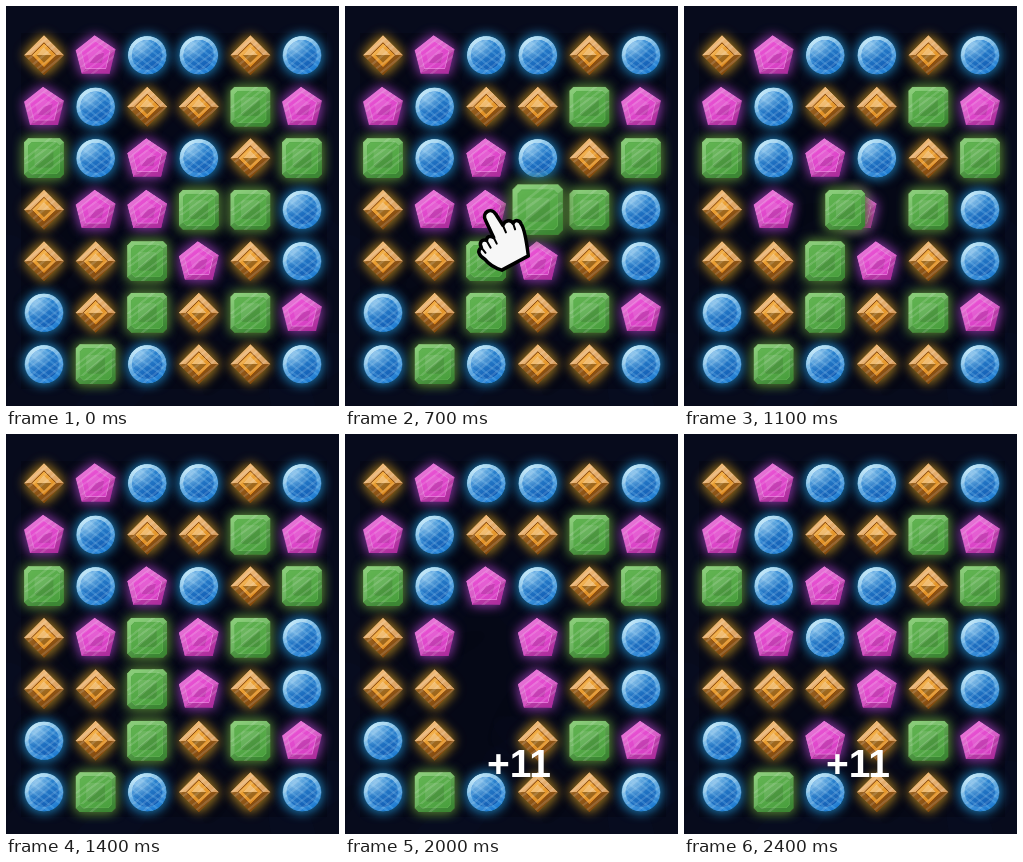
Recreate the animation shown at these times as an HTML page with a canvas. Size 333 px wide and 400 px high, loop 2500 ms.

```html
<!DOCTYPE html>
<html lang="en">
<head>
<meta charset="utf-8">
<title>Gem swap</title>
<style>
html, body { margin: 0; width: 100%; height: 100%; overflow: hidden; background: #070b1c; }
canvas { display: block; }
</style>
</head>
<body>
<canvas id="stage" width="333" height="400"></canvas>
<script>
const ctx = document.getElementById('stage').getContext('2d');
const LOOP = 2500, STEP = 100;
const board = ['OPBBOB', 'PBOOGP', 'GBPBOG', 'OPPGGB', 'OOGPOB', 'BOGOGP', 'BGBOOB'];
const colX = c => 38 + c * 51.6;
const rowY = r => 49.2 + r * 51.5;

const ring = (n, r) => Array.from({ length: n }, (_, i) => {
  const a = i * 2 * Math.PI / n;
  return [r * Math.cos(a), r * Math.sin(a)];
});
// top and low shade the body, lit and core the flat face, line its outline
const kinds = {
  O: { pts: [[0, -20], [20, 0], [0, 20], [-20, 0]], inner: .62, contrast: .3,
       top: '#eda040', low: '#b8640f', lit: '#ffbe50', core: '#d0780f', line: '#8a4a0c', glow: '#8f6a1c' },
  P: { pts: [[-1, -20], [20, -6], [14, 18.5], [-14, 18.5], [-20, -5]], inner: .72, contrast: .1,
       top: '#e968d6', low: '#c332b0', lit: '#ee58d8', core: '#d23ac0', line: '#e673d8', glow: '#74308c' },
  B: { pts: ring(40, 19.3), inner: .78, contrast: 0,
       top: '#b4e0f2', low: '#1676d0', lit: '#3a98dc', core: '#0c55b0', line: '#2f86d4', glow: '#1a6a9c' },
  G: { pts: [[-16, -20], [16, -20], [20, -16], [20, 16], [16, 20], [-16, 20], [-20, 16], [-20, -16]], inner: .78, contrast: .1,
       top: '#7cc66a', low: '#43963a', lit: '#62b452', core: '#4aa03e', line: '#5cae4e', glow: '#4c7430' }
};

function shape(g, pts, fill, s = 1) {
  g.beginPath();
  pts.forEach(([x, y]) => g.lineTo(x * s, y * s));
  g.closePath();
  g.fillStyle = fill;
  g.fill();
}

function slope(g, from, to) {
  const grad = g.createLinearGradient(-9, -18, 9, 18);
  grad.addColorStop(0, from);
  grad.addColorStop(1, to);
  return grad;
}

// Each gem is painted once at double size.
function makeGem({ pts, inner, contrast, top, low, lit, core, line, glow }) {
  const c = document.createElement('canvas');
  c.width = c.height = 128;
  const g = c.getContext('2d');
  const round = pts.length > 12;
  g.translate(64, 64);
  g.scale(2, 2);
  g.shadowColor = glow;
  g.shadowBlur = 24;
  const body = slope(g, top, low);
  shape(g, pts, body);
  shape(g, pts, body, .98);
  g.shadowColor = 'transparent';

  g.globalCompositeOperation = 'source-atop';
  const facets = s => pts.forEach(([x, y], i) => {
    const [u, v] = pts[(i + 1) % pts.length];
    const bright = -(x + u) * .4 - (y + v) > 0;
    g.globalAlpha = contrast;
    shape(g, [[x * s, y * s], [u * s, v * s], [0, 0]], bright ? '#fff' : '#000');
    g.globalAlpha = 1;
  });
  facets(1);
  shape(g, pts, slope(g, lit, core), inner);
  g.lineWidth = .8;
  g.strokeStyle = line;
  g.stroke();
  facets(inner * .6);

  // Slanted reflections, crossed on the round gem
  g.beginPath();
  pts.forEach(([x, y]) => g.lineTo(x, y));
  g.clip();
  const streaks = (angle, color) => {
    g.save();
    g.rotate(angle);
    [[-13, 3], [-7, 1.5], [-2, 4], [6, 1.5], [11, 3]].forEach(([y, h]) =>
      shape(g, [[-20, y + h], [18, y - 2], [20, y], [-16, y + h + 1.5]], color));
    g.restore();
  };
  streaks(-.55, '#ffffff22');
  if (round) {
    streaks(.75, '#8fd4ff38');
    const sheen = g.createRadialGradient(-9, -11, 1, -9, -11, 17);
    sheen.addColorStop(0, '#d8f2ff90');
    sheen.addColorStop(1, '#d8f2ff00');
    shape(g, pts, sheen);
  }
  return c;
}
const gems = Object.fromEntries(Object.entries(kinds).map(([k, v]) => [k, makeGem(v)]));

function gem(kind, x, y, scale = 1, alpha = 1) {
  const w = 64 * scale;
  ctx.globalAlpha = alpha;
  ctx.drawImage(gems[kind], x - w / 2, y - w / 2, w, w);
  ctx.globalAlpha = 1;
}

function backdrop() {
  ctx.fillStyle = '#070b1c';
  ctx.fillRect(0, 0, 333, 400);
  let seed = 7;
  const rnd = () => (seed = seed * 16807 % 2147483647) / 2147483647;
  for (let i = 0; i < 40; i++) {
    ctx.fillStyle = i % 2 ? '#18234614' : '#00000018';
    ctx.beginPath();
    ctx.ellipse(rnd() * 333, rnd() * 400, 10 + rnd() * 35, 6 + rnd() * 20, rnd() * 3, 0, 7);
    ctx.fill();
  }
  ctx.fillStyle = '#02030b50';
  ctx.fillRect(15, 27, 306, 356);
}

const palm = new Path2D('M1 8C-3 0 7-5 11 2L18 13C20 8 26 7 28 11C30 7 35 8 36 12C39 16 41 27 43 43L17 57C10 55 4 51 0 46C-5 43-8 38-3 35C-6 30-2 26 2 28C2 24 6 23 9 25Z');
const creases = new Path2D('M9 25l3 6M2 28l4 7M-3 35l4 5M18 13l3 7M28 11l2 6');
function hand(x, y) {
  ctx.save();
  ctx.translate(x, y);
  ctx.scale(1.02, 1.02);
  ctx.fillStyle = '#f7f7f7';
  ctx.strokeStyle = '#000';
  ctx.lineJoin = ctx.lineCap = 'round';
  ctx.lineWidth = 3.4;
  ctx.fill(palm);
  ctx.stroke(palm);
  ctx.lineWidth = 2;
  ctx.stroke(creases);
  ctx.restore();
}

// Eased progress of a move that starts at the given time
function ease(t, start, span = 350) {
  const p = Math.min(1, Math.max(0, (t - start) / span));
  return .5 - Math.cos(p * Math.PI) / 2;
}

function draw(t) {
  const swap = ease(t, 900), fade = 1 - ease(t, 1600), fall = ease(t, 2030);
  const x2 = colX(2), shift = swap * 51.6;
  backdrop();
  board.forEach((row, r) => [...row].forEach((kind, c) => {
    const moving = c === 2 && r < 6 || c === 3 && r === 3;
    if (!moving) gem(kind, colX(c), rowY(r));
  }));
  [...'BOP'].forEach((kind, r) => {
    gem(kind, x2, rowY(r) + fall * 154.5);
    if (fall > 0) gem(kind, x2, rowY(r) - (1 - fall) * 165);
  });
  gem('P', x2 + shift, rowY(3));
  if (fade > 0) {
    gem('G', x2, rowY(4), 1, fade);
    gem('G', x2, rowY(5), 1, fade);
    gem('G', colX(3) - shift, rowY(3), t >= 600 && t < 900 ? 1.27 : 1, fade);
  }
  if (t >= 200 && t < 900) hand(t < 600 ? 192.5 : 139.5, 206);
  if (t >= 1900) {
    ctx.font = 'bold 39px "Liberation Sans", Arial, sans-serif';
    ctx.textAlign = 'center';
    ctx.fillStyle = '#fff';
    ctx.fillText('+11', 174, 343);
  }
}

const begin = performance.now();
function tick() {
  const t = (performance.now() - begin) % LOOP;
  draw(Math.floor(t / STEP) * STEP);
  requestAnimationFrame(tick);
}
tick();
</script>
</body>
</html>
```
